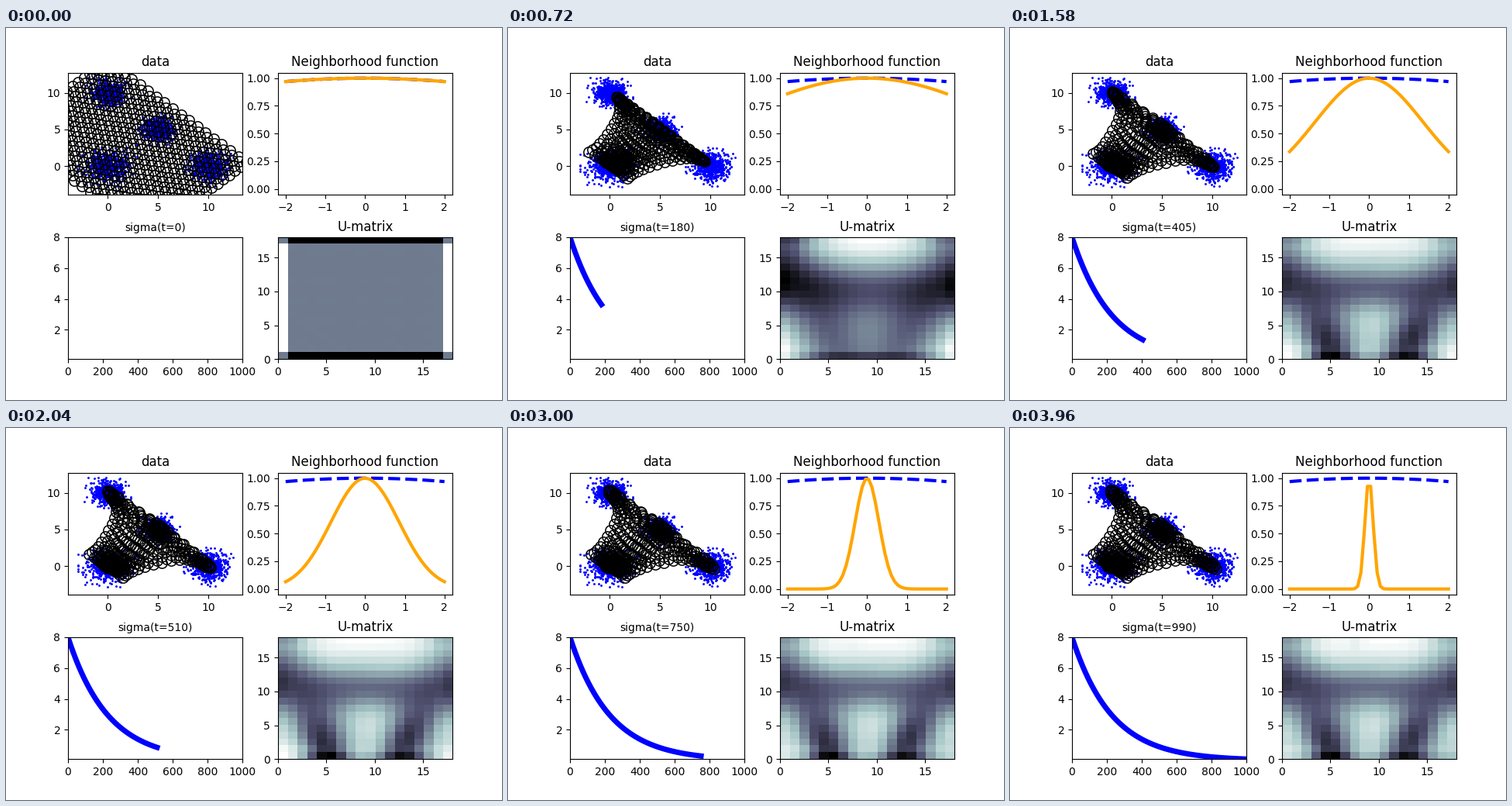
Animation of 640x480 px, one loop 4060 ms. Source, as a matplotlib script:

```python
import numpy as np
import matplotlib.pyplot as plt
from matplotlib.animation import FuncAnimation

SIDE = 18            # map is SIDE x SIDE nodes
STEPS = 1000         # training length
STRIDE = 15          # training steps per picture
LAST = 66            # index of the last picture
TICK = 20            # ms
TICKS = 203          # ticks in one loop
SIGMA_START, SIGMA_END = 8.0, 0.1

rng = np.random.default_rng(4)
centres = np.array([[0, 0], [10, 0], [0, 10], [5, 5]], float)
spreads = [1.0, 0.95, 0.8, 0.75]
clusters = np.array([
    c + s * np.clip(rng.standard_normal((600, 2)), -2.9, 2.9)
    for c, s in zip(centres, spreads)])


def sigma(t):
    return SIGMA_START * (SIGMA_END / SIGMA_START) ** (t / STEPS)


def rate(t):
    return 0.11 * np.exp(-t / 300)


def bell(d2, s):
    return np.exp(-d2 / (2 * s * s))


def initial_nodes():
    """Regular lattice laid along the two diagonals of the data."""
    u, v = np.meshgrid(np.linspace(-14.4, 13.3, SIDE),
                       np.linspace(14.3, -5.3, SIDE))
    return np.column_stack([(u + v).ravel() / 2, (v - u).ravel() / 2])


def cell_centres(nodes):
    w = nodes.reshape(SIDE, SIDE, 2)
    return ((w[1:, 1:] + w[:-1, :-1]) / 2).reshape(-1, 2)


def train():
    """Node positions at every STRIDE-th training step."""
    rows, cols = np.divmod(np.arange(SIDE * SIDE), SIDE)
    grid_d2 = (rows[:, None] - rows) ** 2 + (cols[:, None] - cols) ** 2
    nodes = initial_nodes()
    history = []
    for t in range(LAST * STRIDE + 1):
        if t % STRIDE == 0:
            history.append(nodes.copy())
        picks = rng.integers(0, clusters.shape[1], len(clusters))
        samples = clusters[np.arange(len(clusters)), picks]
        pull = samples[:, None] - nodes
        winners = (pull ** 2).sum(-1).argmin(1)
        h = bell(grid_d2[winners], sigma(t))
        nodes = nodes + rate(t) * (h[:, :, None] * pull).mean(0)
    return history


def u_matrix(nodes):
    """Mean distance to the four neighbours, scaled to 0..1."""
    w = nodes.reshape(SIDE, SIDE, 2)
    across = np.linalg.norm(np.diff(w, axis=1), axis=-1)
    along = np.linalg.norm(np.diff(w, axis=0), axis=-1)
    total = np.zeros((SIDE, SIDE))
    count = np.zeros((SIDE, SIDE))
    for part, gap in (((slice(None), slice(1, None)), across),
                      ((slice(None), slice(None, -1)), across),
                      ((slice(1, None), slice(None)), along),
                      ((slice(None, -1), slice(None)), along)):
        total[part] += gap
        count[part] += 1
    mean = total / count
    return (mean - mean.min()) / (mean.max() - mean.min())


history = train()
matrices = [u_matrix(n) for n in history]
# The untrained lattice is drawn at double density.
shown = [np.vstack([history[0], cell_centres(history[0])])] + history[1:]

plt.rcParams["font.family"] = "DejaVu Sans"
plt.rcParams["text.kerning_factor"] = 6
fig, ((ax_data, ax_bell), (ax_sigma, ax_map)) = plt.subplots(
    2, 2, figsize=(6.4, 4.8), dpi=100)
fig.subplots_adjust(left=0.125, right=0.9, bottom=0.11, top=0.88,
                    wspace=0.2, hspace=0.35)

ax_data.set_title("data")
ax_data.set(xlim=(-3.94, 13.44), ylim=(-3.9, 12.75))
ax_data.plot(*clusters.reshape(-1, 2).T, "o", color="blue", ms=2.1, mew=0)
node_marks, = ax_data.plot([], [], "o", mfc="none", mec="black",
                           ms=9.6, mew=1.1)

ax_bell.set_title("Neighborhood function")
ax_bell.set(xlim=(-2.2, 2.2), ylim=(-0.05, 1.05))
xs = np.linspace(-2, 2, 50)
ax_bell.plot(xs, bell(xs ** 2, SIGMA_START), "--", color="blue", lw=3)
bell_line, = ax_bell.plot([], [], color="orange", lw=3)

sigma_title = ax_sigma.set_title("", fontsize=10)
ax_sigma.set(xlim=(0, STEPS), ylim=(SIGMA_END, SIGMA_START))
sigma_line, = ax_sigma.plot([], [], color="blue", lw=5)

ax_map.set_title("U-matrix")
map_image = ax_map.imshow(matrices[0], cmap="bone_r", vmin=0, vmax=1,
                          origin="lower", extent=(0, SIDE, 0, SIDE),
                          aspect="auto", interpolation="nearest")
ax_map.set_xticks(range(0, SIDE, 5))
ax_map.set_yticks(range(0, SIDE, 5))


def picture_at(tick):
    """Pictures alternate between one tick and five ticks on screen."""
    pair, rest = divmod(tick, 6)
    return min(2 * pair + (rest > 0), LAST)


def draw(tick):
    k = picture_at(tick)
    t = k * STRIDE
    node_marks.set_data(*shown[k].T)
    bell_line.set_data(xs, bell(xs ** 2, sigma(t)))
    past = np.arange(0, t + 1, STRIDE)
    sigma_line.set_data(past, sigma(past))
    sigma_title.set_text(f"sigma(t={t})")
    map_image.set_data(matrices[k])
    return node_marks, bell_line, sigma_line, sigma_title, map_image


anim = FuncAnimation(fig, draw, frames=TICKS, interval=TICK, repeat=True)
plt.show()
```
